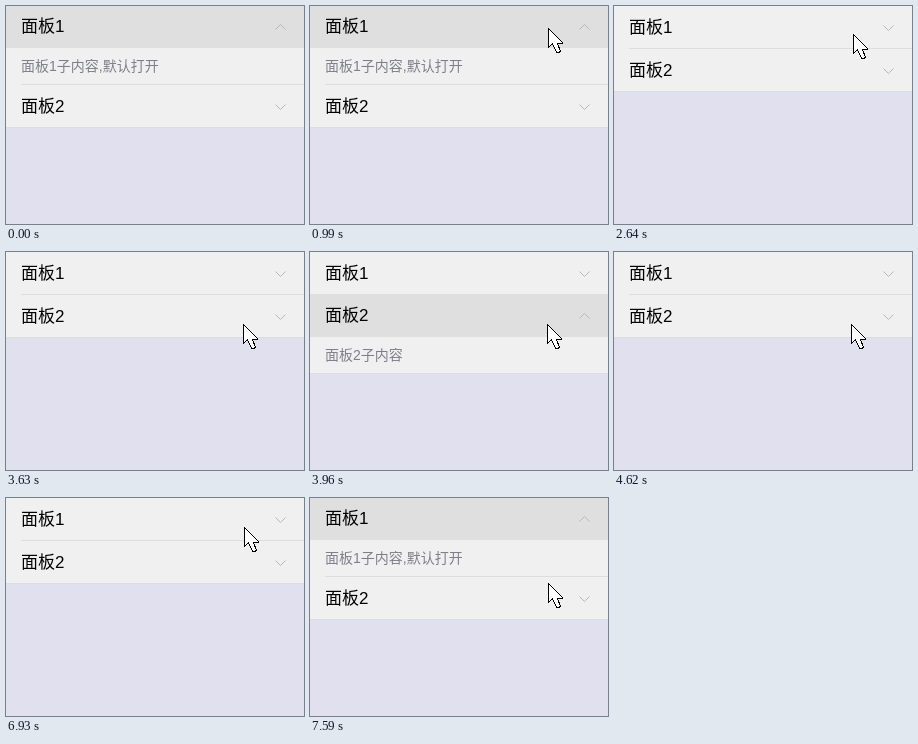
Write an HTML page that moves like this. It is 298 by 218 pixels and loops after 8 s.

```html
<!DOCTYPE html>
<html lang="zh-CN">
<head>
<meta charset="utf-8">
<title>折叠面板</title>
<style>
  html, body { margin: 0; width: 100%; height: 100%; overflow: hidden; background: #e1e0ef; }
  svg { display: block; width: 298px; height: 218px; }
  text { font-family: "Liberation Sans", Arial, "Noto Sans CJK SC", "Noto Sans CJK", sans-serif; font-weight: 300; }
  .label { font-size: 17px; fill: #000; }
  .body { font-size: 14px; fill: #7f7f8a; }
  .head { fill: #dfdfdf; }
  .paper { fill: #f0f0f0; }
  .line { fill: #dedddf; }
  .chevron { fill: none; stroke: #b8b8b8; stroke-width: 1; transform-origin: 274.5px 22px; }
  .pointer { fill: #fff; stroke: #000; stroke-width: 1; shape-rendering: crispEdges; }

  /* every change is a hard step */
  .sheet, .rule, .item, .open, .chevron, .pointer { animation: 8s step-end infinite; }
  .sheet { animation-name: sheet; }
  .rule { animation-name: rule; }
  .one { animation-name: one; }
  .two { animation-name: two; }
  .one .open { animation-name: show1; }
  .two .open { animation-name: show2; }
  .one .chevron { animation-name: flip1; }
  .two .chevron { animation-name: flip2; }
  .pointer { animation-name: move; }

  @keyframes sheet {
    0%, 49.5%, 90.75%, 100% { transform: translateY(36px); }
    16.5%, 57.75% { transform: none; }
  }
  @keyframes rule {
    0%, 90.75%, 100% { transform: translateY(36px); }
    16.5% { transform: none; }
  }
  @keyframes one {
    0%, 90.75%, 100% { transform: translateY(-1px); }
    16.5% { transform: translateY(0); }
  }
  @keyframes two {
    0%, 90.75%, 100% { transform: translateY(79px); }
    16.5%, 57.75% { transform: translateY(43px); }
    49.5% { transform: translateY(42px); }
  }
  @keyframes show1 {
    0%, 90.75%, 100% { visibility: visible; }
    16.5% { visibility: hidden; }
  }
  @keyframes show2 {
    0%, 57.75%, 100% { visibility: hidden; }
    49.5% { visibility: visible; }
  }
  @keyframes flip1 {
    0%, 90.75%, 100% { transform: scaleY(-1); }
    16.5% { transform: scaleY(1); }
  }
  @keyframes flip2 {
    0%, 57.75%, 100% { transform: scaleY(1); }
    49.5% { transform: scaleY(-1); }
  }
  @keyframes move {
    0% { transform: translate(228px, 40px); visibility: hidden; }
    8.25% { transform: translate(228px, 40px); visibility: visible; }
    12.375% { transform: translate(238px, 22px); visibility: visible; }
    33% { transform: translate(239px, 28px); visibility: visible; }
    41.25% { transform: translate(237px, 78px); visibility: visible; }
    45.375% { transform: translate(237px, 72px); visibility: visible; }
    74.25% { transform: translate(237px, 67px); visibility: visible; }
    82.5% { transform: translate(237px, 32px); visibility: visible; }
    86.625% { transform: translate(238px, 29px); visibility: visible; }
    94.875%, 100% { transform: translate(238px, 85px); visibility: visible; }
  }
</style>
</head>
<body>
<svg viewBox="0 0 298 218">
  <g class="sheet">
    <rect class="paper" y="-36" width="298" height="121"/>
    <rect class="line" y="85" width="298" height="1"/>
  </g>
  <g class="rule"><rect class="line" x="15" y="42" width="283" height="1"/></g>

  <g class="item one">
    <g class="open">
      <rect class="head" width="298" height="43"/>
      <text class="body" x="15" y="66">面板1子内容,默认打开</text>
    </g>
    <text class="label" x="15" y="27">面板1</text>
    <path class="chevron" d="M269.5 19.5l5 5 5-5"/>
  </g>

  <g class="item two">
    <g class="open">
      <rect class="head" width="298" height="43"/>
      <text class="body" x="15" y="66">面板2子内容</text>
    </g>
    <text class="label" x="15" y="27">面板2</text>
    <path class="chevron" d="M269.5 19.5l5 5 5-5"/>
  </g>

  <path class="pointer" d="M.5 .5V19.5L4.5 15.5L8.5 24.5H10.5L12.5 23.5L9.5 15.5H14.5V14.5Z"/>
</svg>
</body>
</html>
```
